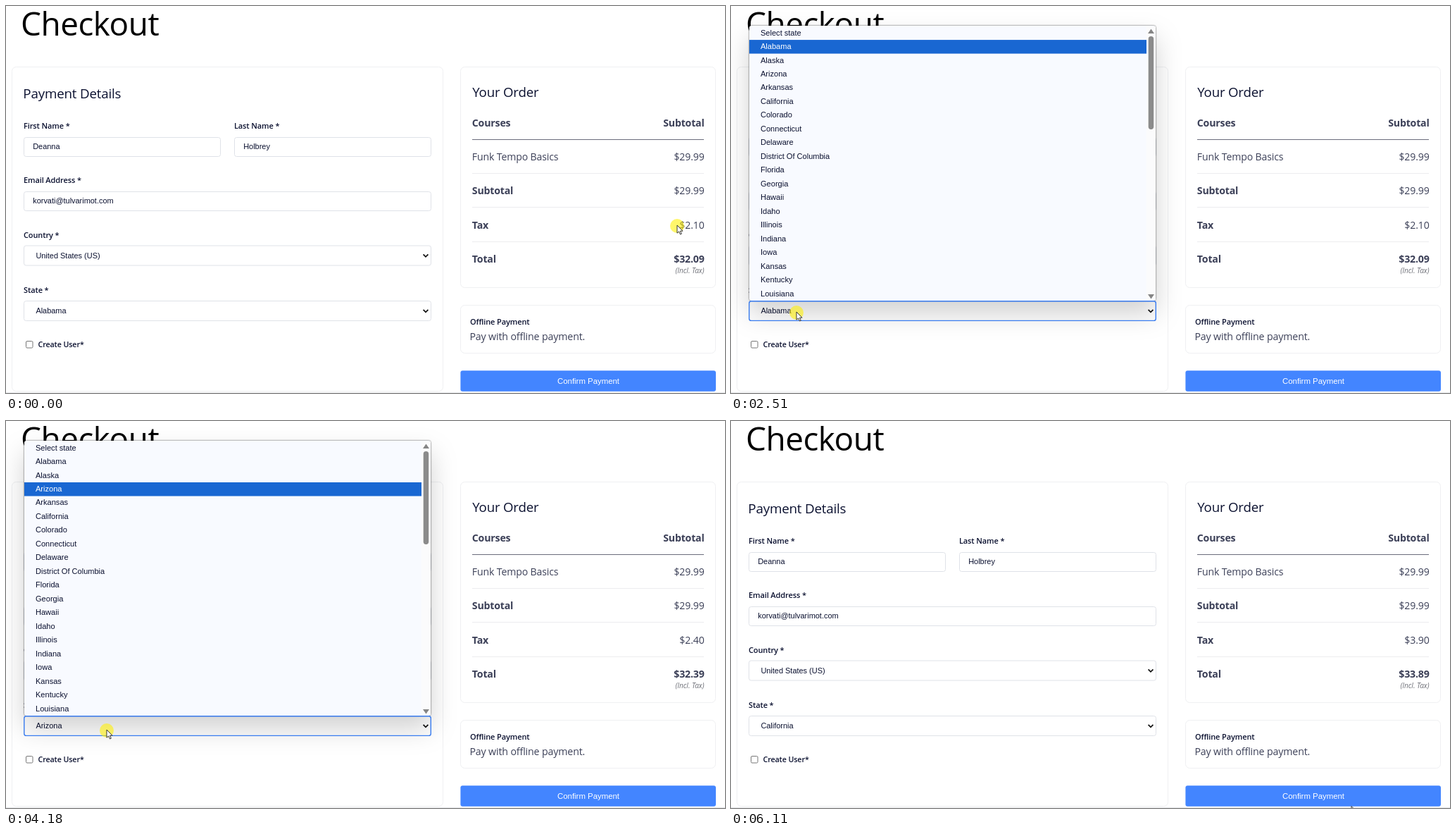
Write an HTML page that moves like this. It is 1021 px wide and 549 px high and loops after 6170 ms.

```html
<!DOCTYPE html>
<html lang="en">
<head>
<meta charset="utf-8">
<title>Checkout</title>
<style>
html, body { margin: 0; width: 100%; height: 100%; overflow: hidden; background: #fff; }
svg { display: block; width: 1021px; height: 549px; }
text { white-space: pre; }
.ui { font-family: 'Open Sans', 'Noto Sans', sans-serif; letter-spacing: -.01em; }
.semi { font-weight: 600; }
.bold { font-weight: 700; letter-spacing: -.015em; }
.ital { font-style: italic; letter-spacing: 0; }
.end { text-anchor: end; }
.mid { text-anchor: middle; }
.ctl { font-family: 'Liberation Sans', Arial, sans-serif; }
.ink { fill: #0b1130; }
.slate { fill: #3c4058; }
.grey { fill: #6b6d75; }
.white { fill: #fff; }
.card { fill: #fff; stroke: #eff0f2; }
.field { fill: #fff; stroke: #dfe2e8; }
.pay { fill: #4385ff; }
.chev { fill: none; stroke: #111; stroke-width: 1.7; }
#focus { fill: none; stroke: #3a7df0; stroke-width: 1.4; }
#panel { fill: #f8faff; filter: drop-shadow(0 0 1px rgba(0,0,0,.7)) drop-shadow(0 18px 18px rgba(0,0,0,.18)); }
</style>
</head>
<body>
<svg id="stage" viewBox="0 0 1021 549" xmlns="http://www.w3.org/2000/svg"></svg>
<script>
const LOOP = 6170;
const ROW = 19.47, LIST_TOP = 28.6, LIST_END = 418;
const ORDER_TOP = 171, ORDER_ROW = 48.2;
const PRICE = 29.99;
const STATES = ['Select state', 'Alabama', 'Alaska', 'Arizona', 'Arkansas', 'California', 'Colorado',
  'Connecticut', 'Delaware', 'District Of Columbia', 'Florida', 'Georgia', 'Hawaii', 'Idaho',
  'Illinois', 'Indiana', 'Iowa', 'Kansas', 'Kentucky', 'Louisiana'];
const CHOICES = [
  { from: 0, name: 'Alabama', rate: .07 },
  { from: 2850, name: 'Arizona', rate: .08 },
  { from: 4920, name: 'California', rate: .13 }
];

const money = n => '$' + n.toFixed(2);
const text = (x, y, size, str, cls, id = '') =>
  `<text x="${x}" y="${y}" font-size="${size}" class="${cls}" id="${id}">${str}</text>`;
const box = (x, y, w, h, r, cls, id = '') =>
  `<rect x="${x}" y="${y}" width="${w}" height="${h}" rx="${r}" class="${cls}" id="${id}"/>`;
const label = (x, y, str) => text(x, y, 11, str, 'ui semi ink');

const input = (x, y, w, name, value) =>
  label(x - .5, y - 12.3, name) + box(x, y, w, 27, 3, 'field') +
  text(x + 12.7, y + 16.6, 10.95, value, 'ctl ink');

const select = (y, name, value, id) =>
  label(25, y - 11.5, name) + box(25.5, y, 578, 28, 3, 'field', id + 'Box') +
  text(42.4, y + 17.9, 10.95, value, 'ctl ink', id) +
  `<path class="chev" d="M592.6 ${y + 12.3}l3.4 3.5l3.4 -3.5"/>`;

function orderRow(i, name, cost, nameCls, costCls, id) {
  const y = ORDER_TOP + ORDER_ROW * i;
  const size = cls => cls === 'bold' ? 14.2 : 14.1;
  const line = i < 4 ? `<path d="M662 ${Math.round(y + 18) + .5}H991" stroke="${i ? '#ececef' : '#6a6c7c'}"/>` : '';
  return text(661.8, y, size(nameCls), name, `ui slate ${nameCls}`) +
    text(991.6, y, size(costCls), cost, `ui slate end ${costCls}`, id) + line;
}

const form =
  text(21, 42, 45.9, 'Checkout', 'ui') +
  box(8.5, 86.5, 612, 460, 6, 'card') +
  text(24.3, 131, 18.75, 'Payment Details', 'ui ink') +
  input(25.5, 186.5, 279, 'First Name *', 'Deanna') +
  input(324.5, 186.5, 279, 'Last Name *', 'Holbrey') +
  input(25.5, 263.5, 578, 'Email Address *', 'korvati@tulvarimot.com') +
  select(340, 'Country *', 'United States (US)', 'country') +
  select(418.5, 'State *', '', 'state') +
  '<rect x="28.5" y="475.5" width="9.5" height="9.5" rx="1.5" fill="#fff" stroke="#767676"/>' +
  text(45.5, 484.4, 10.7, 'Create User*', 'ui semi ink');

const order =
  box(645.5, 86.5, 362, 313, 6, 'card') +
  text(662.3, 129, 18.65, 'Your Order', 'ui ink') +
  orderRow(0, 'Courses', 'Subtotal', 'bold', 'bold') +
  orderRow(1, 'Funk Tempo Basics', money(PRICE), '', '') +
  orderRow(2, 'Subtotal', money(PRICE), 'bold', '') +
  orderRow(3, 'Tax', '', 'bold', '', 'tax') +
  orderRow(4, 'Total', '', 'bold', 'bold', 'total') +
  text(991.5, 379.2, 10, '(Incl. Tax)', 'ui ital grey end') +
  box(645.5, 424.5, 362, 68, 6, 'card') +
  label(659, 451.8, 'Offline Payment') +
  text(658.4, 473.6, 14.2, 'Pay with offline payment.', 'ui slate') +
  box(645.4, 517.3, 362.6, 29.5, 3, 'pay') +
  text(827, 536, 11.4, 'Confirm Payment', 'ctl mid white') +
  '<path d="M0 548.5H1021" stroke="#e6e7ea"/>';

const popup = `<g id="popup">
  ${box(26, 28, 577, 390, 3, '', 'panel')}
  <rect x="590" y="29" width="13" height="388" fill="#fbfbfc"/>
  <rect x="592.7" y="43" width="7.5" height="132" rx="3.7" fill="#8b8b8b"/>
  <path d="M592 39h9L596.5 32.5Z M592 409h9L596.5 415.5Z" fill="#858585"/>
  <rect id="hover" x="26" width="564" height="19.5" fill="#1967d2"/>
  ${STATES.map((s, i) => text(42, LIST_TOP + 13 + i * ROW, 11.05, s, 'ctl ink item')).join('')}
</g>` + box(25.8, 418.8, 577.5, 27.6, 3, '', 'focus');

const pointer = `<g id="pointer">
  <circle id="halo" cy="1" r="10" fill="#fff000" opacity=".58"/>
  <path d="M0 0V11.2L2.6 8.9L4.5 13L6.3 12.2L4.5 8.2H8Z" fill="#fff" stroke="#222" stroke-width=".9"/>
</g>`;

document.getElementById('stage').innerHTML = form + order + popup + pointer;
const $ = id => document.getElementById(id);
const items = [...document.querySelectorAll('.item')];

// places the pointer visits
const TAX = [953, 311], TAX_END = [998, 315], LOW = [972, 437], ASIDE = [971, 414];
const FIELD = [93, 434], FIELD_MID = [143, 438], ARIZONA = [69, 97], CALIFORNIA = [134, 138], EXIT = [881, 546.5];

// start, end, from, to, optional bend; the pointer rests between moves
const MOVES = [
  [70, 470, TAX, TAX_END],
  [670, 1020, TAX_END, LOW],
  [1220, 1840, LOW, FIELD, [450, 625]],
  [2510, 2720, FIELD, ARIZONA],
  [2850, 3180, ASIDE, TAX],
  [3260, 3480, TAX, TAX_END],
  [3480, 3850, TAX_END, FIELD_MID],
  [4260, 4590, FIELD_MID, CALIFORNIA, [240, 270]],
  [4920, 5340, ASIDE, TAX],
  [5340, 5620, TAX, TAX_END],
  [5620, 5900, TAX_END, TAX],
  [5900, 6110, TAX, EXIT]
];

const ease = k => k * k * (3 - 2 * k);

function pointerAt(t) {
  const [start, end, a, b, bend] = MOVES.findLast(m => t >= m[0]) || MOVES[0];
  const k = ease(Math.min(1, Math.max(0, (t - start) / (end - start))));
  return a.map((p, i) => {
    const c = bend ? bend[i] : (p + b[i]) / 2;
    return (1 - k) ** 2 * p + 2 * k * (1 - k) * c + k * k * b[i];
  });
}

const within = (t, ...spans) => spans.some(([a, b]) => t >= a && t < b);
const show = (id, on) => $(id).setAttribute('visibility', on ? 'visible' : 'hidden');

function draw(t) {
  const [x, y] = pointerAt(t);
  const { name, rate } = CHOICES.findLast(c => t >= c.from);
  const tax = PRICE * rate;
  const open = within(t, [2040, 2850], [3920, 4920]);
  const focused = within(t, [1840, 2920], [3780, 4990]);
  const pressed = within(t, [1840, 2180], [2850, 2920], [3780, 3990], [4920, 4990], [6110, LOOP]);

  $('state').textContent = name;
  $('tax').textContent = money(tax);
  $('total').textContent = money(PRICE + tax);
  $('stateBox').style.fill = focused && !open && t > 2850 ? '#f8faff' : '#fff';

  const over = y >= LIST_TOP && y < LIST_END && x < 590;
  const row = over ? Math.floor((y - LIST_TOP) / ROW) : STATES.indexOf(name);
  $('hover').setAttribute('y', LIST_TOP + row * ROW);
  items.forEach((el, i) => { el.style.fill = i === row ? '#fff' : ''; });

  show('popup', open);
  show('focus', focused);
  show('halo', !pressed);
  $('pointer').setAttribute('transform', `translate(${x.toFixed(2)} ${y.toFixed(2)})`);
}

const start = performance.now();
function tick() {
  draw((performance.now() - start) % LOOP);
  requestAnimationFrame(tick);
}
draw(0);
requestAnimationFrame(tick);
</script>
</body>
</html>
```
